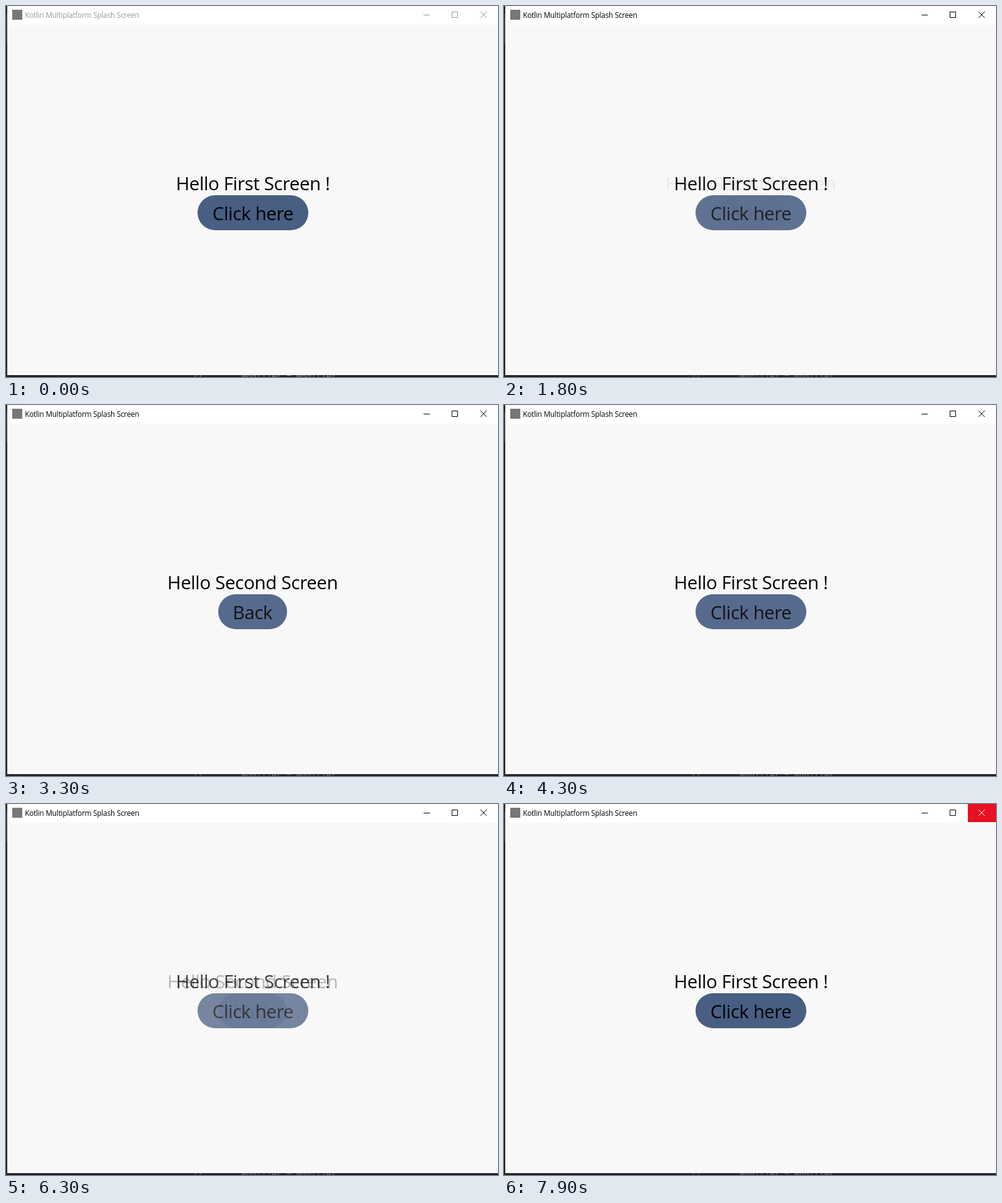
Animation of 786 by 594 pixels, one loop 8000 ms. Source, as an HTML page:

```html
<!DOCTYPE html>
<html lang="en">
<head>
<meta charset="utf-8">
<title>Splash Screen</title>
<style>
  html, body { margin: 0; width: 100%; height: 100%; overflow: hidden; background: #232325; }
  svg { display: block; width: 786px; height: 594px; }
  text { font-family: "Open Sans", "Noto Sans", sans-serif; white-space: pre; }
  .title { font-size: 11.7px; letter-spacing: -0.17px; }
  .big { font-size: 29.4px; letter-spacing: -0.35px; text-anchor: middle; }
  .code { font-family: "DejaVu Sans Mono", monospace; font-size: 13.2px; fill: #858585; }
</style>
</head>
<body>
<svg viewBox="0 0 786 594" xmlns="http://www.w3.org/2000/svg">
  <rect width="786" height="594" fill="#232325"/>
  <rect y="12" width="2" height="48" fill="#3a3a3c"/>
  <g id="editor" class="code">
    <text class="code" x="298" y="599">//</text>
    <text class="code" x="376.5" y="598">Modifier = Modifier</text>
  </g>
  <rect x="2" width="784" height="591" fill="#fff"/>
  <rect x="2" y="30" width="784" height="561" fill="#f8f8f8"/>

  <rect x="10" y="6" width="16" height="16" fill="#777"/>
  <text id="title" class="title" x="30.2" y="19">Kotlin Multiplatform Splash Screen</text>
  <rect id="closeBg" x="741" width="45" height="29" fill="#e81123"/>
  <g fill="none" stroke-width="1">
    <path id="frame" d="M667 14.5h10M712.5 9.5h9v9h-9z"/>
    <path id="cross" d="M758 9l10 10M768 9l-10 10"/>
  </g>

  <g id="screens">
    <g id="second">
      <text class="big" x="394" y="295">Hello Second Screen</text>
      <rect x="339" y="303" width="110" height="56" rx="28"/>
      <text class="big" x="394" y="343">Back</text>
    </g>
    <g id="first">
      <text class="big" x="394.5" y="295">Hello First Screen !</text>
      <rect x="306" y="303" width="177" height="56" rx="28"/>
      <text class="big" x="394.5" y="343">Click here</text>
    </g>
  </g>
</svg>
<script>
const LOOP = 8000, STEP = 100, FADE = 700;
const FOCUS_AT = 1000, CLOSE_AT = 7500;
const BASE = '#485e83', HOVER = '#566a8d';

const $ = id => document.getElementById(id);
const screens = $('screens');

// Each click swaps the two screens; hover spans are in ms.
const clicks = [1700, 3500, 4550, 5970];
const pages = [
  { el: $('first'), hover: [[500, 2400], [4200, 5250], [6700, 7000]] },
  { el: $('second'), hover: [[2700, 4200], [5500, 6670]] }
];
for (const p of pages) {
  p.button = p.el.querySelector('rect');
  p.label = p.el.lastElementChild;
}

// cubic-bezier(.4, 0, .2, 1)
function ease(x) {
  if (x <= 0) return 0;
  if (x >= 1) return 1;
  let lo = 0, hi = 1;
  for (let i = 0; i < 24; i++) {
    const s = (lo + hi) / 2, r = 1 - s;
    if (1.2 * r * r * s + 0.6 * r * s * s + s * s * s < x) lo = s; else hi = s;
  }
  return 3 * (1 - lo) * lo * lo + lo * lo * lo;
}

function render(t) {
  const count = clicks.filter(c => c <= t).length;
  const shown = pages[count % 2], hidden = pages[(count + 1) % 2];
  const p = count ? ease((t - clicks[count - 1]) / FADE) : 1;

  if (screens.lastElementChild !== shown.el) screens.appendChild(shown.el);
  shown.el.setAttribute('opacity', p);
  hidden.el.setAttribute('opacity', 1 - p);

  for (const page of pages) {
    const over = page.hover.some(([a, b]) => t >= a && t < b);
    page.button.setAttribute('fill', over ? HOVER : BASE);
    page.label.setAttribute('fill', over ? '#121212' : '#000');
  }

  const ink = t >= FOCUS_AT ? '#000' : '#999';
  const closing = t >= CLOSE_AT;
  $('title').setAttribute('fill', ink);
  $('frame').setAttribute('stroke', ink);
  $('cross').setAttribute('stroke', closing ? '#fff' : ink);
  $('closeBg').setAttribute('opacity', closing ? 1 : 0);
  $('editor').setAttribute('opacity', t >= FOCUS_AT ? 0.7 : 1);
}

const start = performance.now();
function tick() {
  const t = (performance.now() - start) % LOOP;
  render(Math.floor(t / STEP) * STEP);
  requestAnimationFrame(tick);
}
tick();
</script>
</body>
</html>
```
